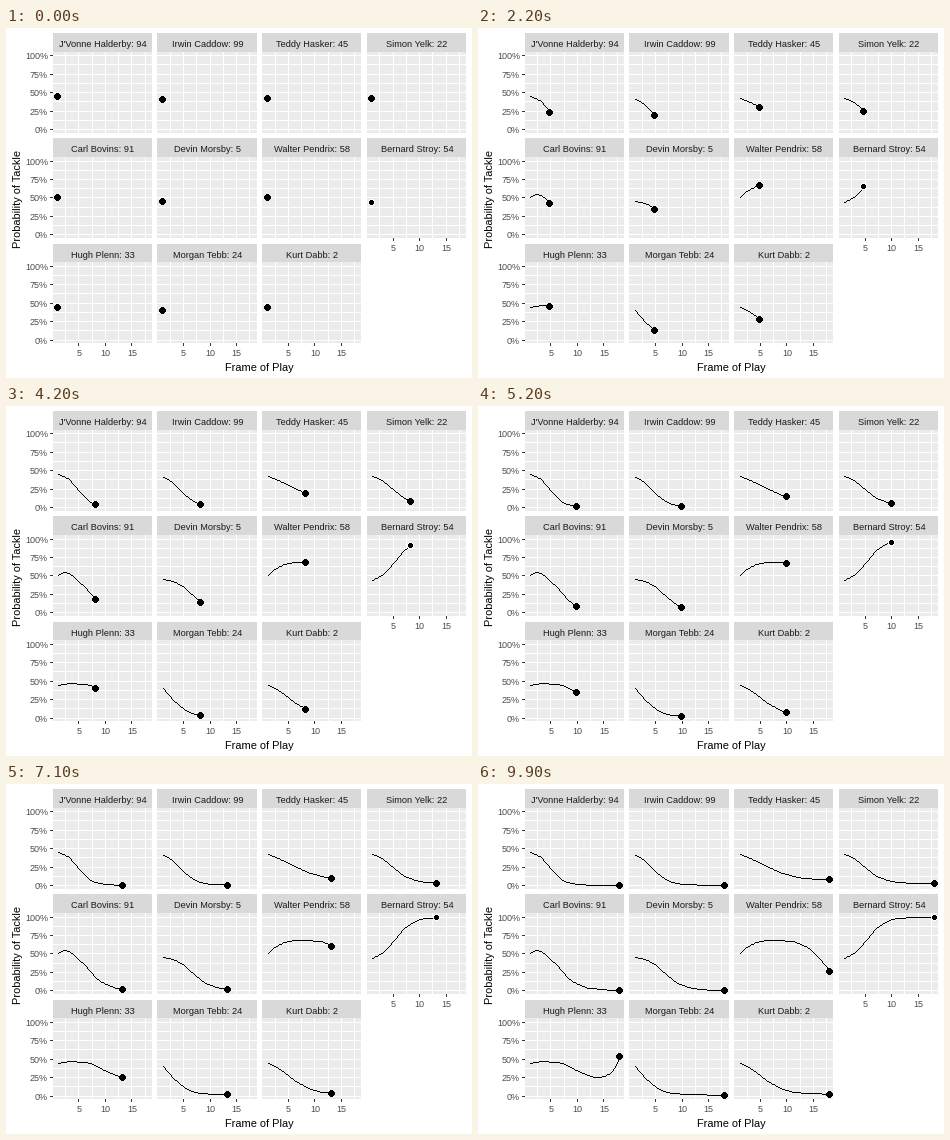
A matplotlib script that plays this animation: 466x350 px, repeating every 10000 ms.

```python
import numpy as np
import matplotlib.pyplot as plt
from matplotlib.animation import FuncAnimation
from matplotlib.patches import Circle, Rectangle

W, H, DPI = 466, 350, 64
PX = 72 / DPI            # points per pixel
FRAMES, INTERVAL = 100, 100

LEFT, TOP = 47, 5.5
PANEL_W, PANEL_H, STRIP_H = 99.3, 81, 18.6
PITCH_X, PITCH_Y = 104.8, 105.3
X_UNIT, Y_UNIT = PANEL_W / 18.7, PANEL_H / 1.1

STEPS = np.arange(1, 19)

# label, final level (%), then sigmoid drops as (size, midpoint, width)
PLAYERS = [
    ("J'Vonne Halderby: 94", 0.3, (46, 4.8, 1.28)),
    ("Irwin Caddow: 99", 0.3, (46.5, 4.2, 1.6)),
    ("Teddy Hasker: 45", 7, (43.5, 5.2, 3)),
    ("Simon Yelk: 22", 2.5, (45, 4.7, 1.85)),
    ("Carl Bovins: 91", 0.4, (65, 6.1, 2), (-20, 1, 0.7)),
    ("Devin Morsby: 5", 0.4, (47, 6.6, 1.8)),
    ("Walter Pendrix: 58", 0, (69, 17, 1.9), (-37, 1, 1.36)),
    ("Bernard Stroy: 54", 99.5, (-60, 5.2, 1.7)),
    ("Hugh Plenn: 33", 83, (24, 9.7, 1.5), (-60, 18, 1), (-2.5, 2, 0.3)),
    ("Morgan Tebb: 24", 1.3, (61, 2, 1.9)),
    ("Kurt Dabb: 2", 2.5, (47, 5.2, 2.1)),
]
STARRED = 7

plt.rcParams["font.family"] = "Liberation Sans"
fig = plt.figure(figsize=(W / DPI, H / DPI), dpi=DPI, facecolor="white")
ax = fig.add_axes([0, 0, 1, 1])
ax.set(xlim=(0, W), ylim=(H, 0))
ax.axis("off")


def box(x0, y0, x1, y1, color):
    x0, y0, x1, y1 = np.floor([x0, y0, x1, y1])
    ax.add_patch(Rectangle((x0, y0), x1 - x0, y1 - y0, fc=color, lw=0, aa=False))


def hline(x0, x1, y, color):
    box(x0, y, x1, np.floor(y) + 1, color)


def vline(x, y0, y1, color):
    box(x, y0, np.floor(x) + 1, y1, color)


def label(x, y, text, size, color, ha="center", **kw):
    ax.text(x, y, text, size=size * PX, color=color, ha=ha, va="baseline", **kw)


def curve(end, drops):
    return end + sum(a / (1 + np.exp((STEPS - mid) / w)) for a, mid, w in drops)


def trace(xs, ys):
    """Pixels of a one-pixel polyline through whole-pixel vertices."""
    out = [(xs[0], ys[0])]
    for x0, y0, x1, y1 in zip(xs, ys, xs[1:], ys[1:]):
        n = int(max(abs(x1 - x0), abs(y1 - y0)))
        u = np.arange(1, n + 1) / max(n, 1)
        out += zip(np.round(x0 + u * (x1 - x0)), np.round(y0 + u * (y1 - y0)))
    return np.transpose(out) + 0.5


class Panel:
    def __init__(self, index, name, end, *drops):
        row, col = divmod(index, 4)
        self.x = LEFT + col * PITCH_X
        self.top = TOP + row * PITCH_Y
        self.y = self.top + STRIP_H
        self.right, self.bottom = self.x + PANEL_W, self.y + PANEL_H
        self.probs = curve(end, drops) / 100
        self.draw_back(name)
        if col == 0:
            self.draw_y_axis()
        if index >= STARRED:
            self.draw_x_axis()
        self.line, = ax.plot([], [], ls="none", marker=",", color="black",
                             aa=False, zorder=3)
        if index == STARRED:
            self.dots = [self.dot(2.9, "white"), self.dot(1.9, "black")]
        else:
            self.dots = [self.dot(2.9, "black")]

    def px(self, step):
        return self.x + (step - 0.15) * X_UNIT

    def py(self, prob):
        return self.bottom - (prob + 0.05) * Y_UNIT

    def dot(self, radius, color):
        return ax.add_patch(Circle((0, 0), radius, fc=color, lw=0, aa=False,
                                   snap=False, zorder=4))

    def draw_back(self, name):
        box(self.x, self.top, self.right, self.y, "#D9D9D9")
        box(self.x, self.y, self.right, self.bottom, "#EBEBEB")
        for p in np.arange(9) / 8:
            hline(self.x, self.right, self.py(p), "white")
        for s in np.arange(2.5, 18, 2.5):
            vline(self.px(s), self.y, self.bottom, "white")
        label((self.x + self.right) / 2, np.floor(self.top) + 14, name, 9.2, "#1A1A1A")

    def draw_y_axis(self):
        for p in (0, 25, 50, 75, 100):
            y = self.py(p / 100)
            hline(self.x - 3, self.x, y, "#333333")
            label(self.x - 5, np.floor(y) + 4, f"{p}%", 9, "#4D4D4D", "right")

    def draw_x_axis(self):
        for s in (5, 10, 15):
            x = self.px(s)
            vline(x, self.bottom, self.bottom + 3, "#333333")
            label(x, np.floor(self.bottom) + 13, str(s), 9, "#4D4D4D")

    def reveal(self, step):
        xs = np.append(STEPS[STEPS < step], step)
        ps = np.interp(xs, STEPS, self.probs)
        pixels = trace(np.floor(self.px(xs)), np.floor(self.py(ps)))
        self.line.set_data(*pixels)
        for d in self.dots:
            d.center = pixels[:, -1]
        return [self.line, *self.dots]


panels = [Panel(i, *p) for i, p in enumerate(PLAYERS)]
label(253, 343, "Frame of Play", 11, "black")
label(15, 171, "Probability of Tackle", 11, "black", rotation=90, rotation_mode="anchor")


def update(i):
    step = 1 + 17 * i / (FRAMES - 1)
    return [artist for p in panels for artist in p.reveal(step)]


anim = FuncAnimation(fig, update, frames=FRAMES, interval=INTERVAL,
                     repeat=True, repeat_delay=0, blit=False)
plt.show()
```
